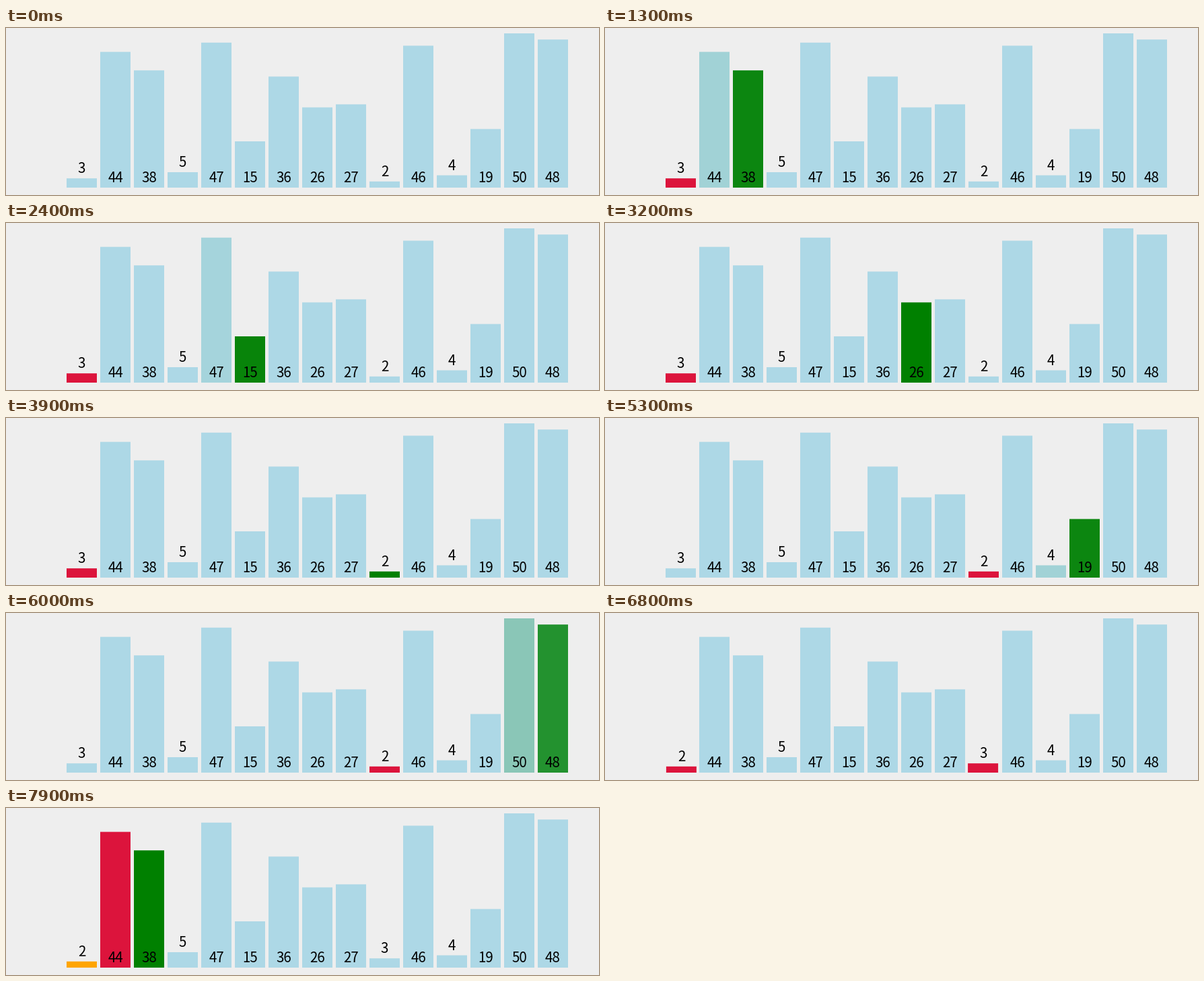
Write a matplotlib script that moves like this. It is 881 px wide and 249 px high and loops after 8000 ms.

```python
import matplotlib.pyplot as plt
import numpy as np
from matplotlib.animation import FuncAnimation
from matplotlib.colors import to_rgb
from matplotlib.patches import Rectangle

W, H, DPI = 881, 249, 64
FPS, LOOP_MS = 10, 8000
VALUES = [3, 44, 38, 5, 47, 15, 36, 26, 27, 2, 46, 4, 19, 50, 48]

LEFT, PITCH, BAR_W, BASE, UNIT = 90, 50, 45, 238, 4.6
FONT_PX = 20.5

FIRST_STEP, STEP_MS, EASE_MS = 388, 363.64, 250

IDLE, COMPARE, MINIMUM, SORTED = "lightblue", "green", "crimson", "orange"


def selection_sort_steps(values):
    """Yield (slot of each bar, colour of each bar) after every step."""
    n = len(values)
    order = list(range(n))
    colors = [IDLE] * n

    def snapshot():
        slots = np.argsort(order).astype(float)
        return slots, np.array([to_rgb(c) for c in colors])

    yield snapshot()
    for i in range(n - 1):
        low = i
        colors[order[i]] = MINIMUM
        yield snapshot()
        for j in range(i + 1, n):
            colors[order[j]] = COMPARE
            yield snapshot()
            if values[order[j]] < values[order[low]]:
                colors[order[low]] = IDLE
                low = j
                colors[order[low]] = MINIMUM
                yield snapshot()
            else:
                colors[order[j]] = IDLE
        if low != i:
            colors[order[i]] = MINIMUM
            yield snapshot()
            order[i], order[low] = order[low], order[i]
            yield snapshot()
            colors[order[low]] = IDLE
        colors[order[i]] = SORTED
        yield snapshot()


def cubic_in_out(p):
    p = min(max(p, 0), 1)
    return 4 * p**3 if p < 0.5 else 1 - 4 * (1 - p)**3


def mix(a, b, p):
    return a + (b - a) * p


steps = list(selection_sort_steps(VALUES))

fig = plt.figure(figsize=(W / DPI, H / DPI), dpi=DPI, facecolor="#eeeeee")
ax = fig.add_axes([0, 0, 1, 1])
ax.set_xlim(0, W)
ax.set_ylim(H, 0)
ax.axis("off")

bars, labels = [], []
for i, value in enumerate(VALUES):
    top = BASE - UNIT * value
    bar = Rectangle((0, top), BAR_W, UNIT * value, lw=0, snap=False, zorder=2 * i)
    bars.append(ax.add_patch(bar))
    # Short bars carry their number on top, tall ones at the foot.
    baseline = top - 8 if value < 10 else BASE - 8
    labels.append(ax.text(0, baseline, str(value), ha="center", va="baseline",
                          color="black", family="Noto Sans CJK JP",
                          fontsize=FONT_PX * 72 / DPI, zorder=2 * i + 1))


def draw(frame):
    elapsed = frame * 1000 / FPS - FIRST_STEP
    k = max(int(elapsed // STEP_MS), 0)
    p = cubic_in_out((elapsed - k * STEP_MS) / EASE_MS)
    (slots_a, colors_a), (slots_b, colors_b) = steps[k], steps[k + 1]
    slots, colors = mix(slots_a, slots_b, p), mix(colors_a, colors_b, p)
    for bar, label, slot, color in zip(bars, labels, slots, colors):
        x = LEFT + PITCH * slot
        bar.set_x(x)
        bar.set_facecolor(color)
        label.set_x(x + BAR_W / 2)
    return bars + labels


anim = FuncAnimation(fig, draw, frames=LOOP_MS * FPS // 1000, interval=1000 / FPS,
                     repeat=True, repeat_delay=0, blit=False)
plt.show()
```
